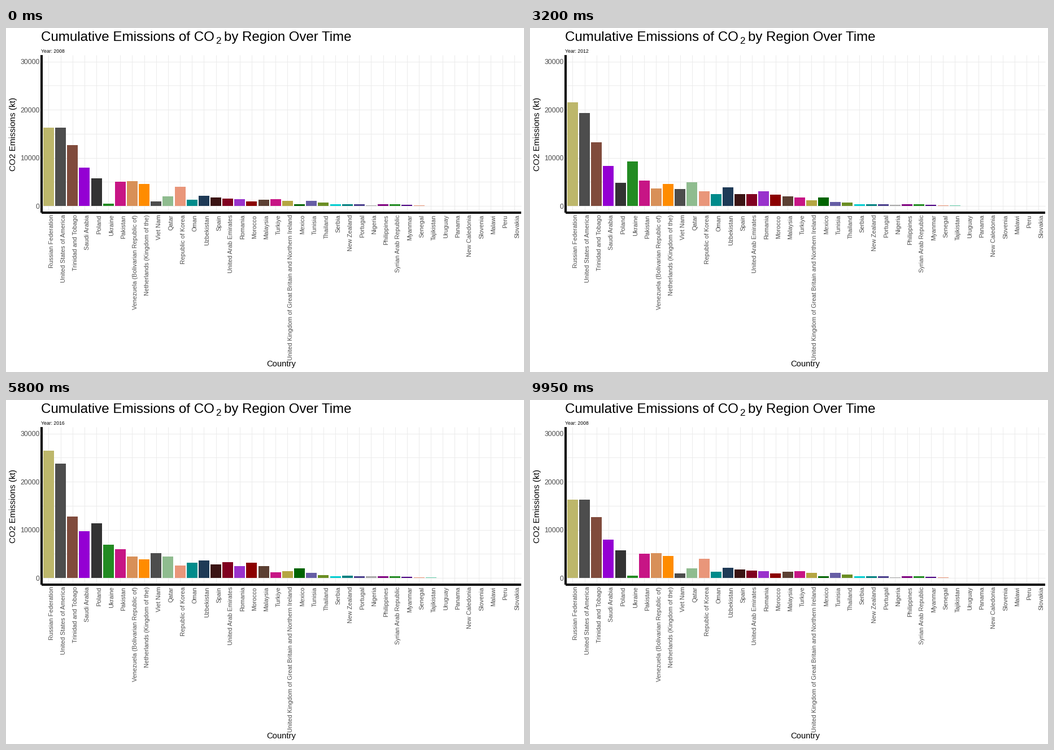
Recreate the animation shown at these times as a matplotlib script. Size 917 by 611 pixels, loop 10000 ms.

```python
import matplotlib.pyplot as plt
import numpy as np
from matplotlib.animation import FuncAnimation
from matplotlib.collections import LineCollection
from matplotlib.patches import Rectangle

W, H, DPI = 917, 611, 64
FRAMES, INTERVAL = 200, 50
FIRST_YEAR = 2008

# Panel geometry in pixels
LEFT, RIGHT, TOP, BOTTOM = 62.7, 912, 48, 327.7
FIRST_X, STEP_X, BAR_W = 75.4, 21.15, 19
ZERO_Y, PX_PER_KT = 316, 0.00855

# Country, bar colour, emissions in 100 kt spread over the years
COUNTRIES = [
    ("Russian Federation", "#bdb76b", 162, 211, 219, 264, 262, 296),
    ("United States of America", "#4d4d4d", 162, 169, 215.5, 237, 277, 282),
    ("Trinidad and Tobago", "#804b3c", 126, 141, 125, 128, 124, 168),
    ("Saudi Arabia", "#9400d3", 79, 83, 84, 97, 102, 115),
    ("Poland", "#333333", 57, 42, 53, 114, 110, 111),
    ("Ukraine", "#228b22", 5, 59, 123, 69, 44, 99),
    ("Pakistan", "#c71585", 50, 54, 51, 60, 56, 67),
    ("Venezuela (Bolivarian Republic of)", "#d89058", 52, 40, 33, 44, 46, 51),
    ("Netherlands (Kingdom of the)", "#ff8c00", 46, 47, 45, 39, 32, 37),
    ("Viet Nam", "#4d4d4d", 9, 11, 57, 52, 52, 55),
    ("Qatar", "#8fbc8f", 20, 23, 74, 45, 43, 41),
    ("Republic of Korea", "#e9967a", 39.5, 32, 30, 26, 27, 34),
    ("Oman", "#008b8b", 13, 14, 34, 32, 31, 34),
    ("Uzbekistan", "#1e3a56", 21, 22, 54, 36, 8.5, 18),
    ("Spain", "#3b1414", 18, 24, 26, 28, 29, 31),
    ("United Arab Emirates", "#800020", 15, 16, 32, 33, 30, 33),
    ("Romania", "#9932cc", 14, 13, 47, 25, 30, 28),
    ("Morocco", "#8b0000", 9, 25, 23, 31, 28, 31),
    ("Malaysia", "#5c4033", 13, 19, 21, 24, 27, 27),
    ("Turkiye", "#c71585", 14, 19, 16, 12, 15, 24),
    ("United Kingdom of Great Britain and Northern Ireland", "#b5a642", 10, 15.5),
    ("Mexico", "#006400", 4, 9, 25, 20, 8.5, 11),
    ("Tunisia", "#665ea5", 10, 6, 11, 11, 12, 13),
    ("Thailand", "#6b8e23", 7.5, 5),
    ("Serbia", "#00ced1", 4),
    ("New Zealand", "#008080", 3, 5),
    ("Portugal", "#483d8b", 4),
    ("Nigeria", "#a9a9a9", 1, 5),
    ("Philippines", "#800080", 3, 4.5),
    ("Syrian Arab Republic", "#228b22", 4, 3),
    ("Myanmar", "#4b0082", 2),
    ("Senegal", "#e9967a", 1),
    ("Tajikistan", "#66cdaa", 1),
]
EMPTY = ["Uruguay", "Panama", "New Caledonia", "Slovenia", "Malawi", "Peru", "Slovakia"]
KNOTS = (2008, 2011 + 1 / 9, 2013 + 2 / 3, 2016.375, 2018, 2020.5)

STARTS = [5 + 14 * k for k in range(7)] + [101 + 13 * k for k in range(8)]


def emissions(points, year):
    """Height in kt at a fractional year."""
    if len(points) == len(KNOTS):
        times = KNOTS
    else:
        times = np.linspace(KNOTS[0], KNOTS[-1], len(points))
    late_growth = 1 + 0.012 * np.clip(year - KNOTS[-1], 0, 0.5)
    return 100 * np.interp(year, times, points) * late_growth


def reported(name, year):
    if name == "Tajikistan":
        return year >= 2011
    return not (name == "Qatar" and year == 2018)


def timeline(frame):
    """Start year, end year and progress of the move between them."""
    k = sum(start <= frame for start in STARTS) - 1
    if k < 0:
        return FIRST_YEAR, FIRST_YEAR, 1
    steps = 9 if k < 6 else 8
    progress = min(1, (frame - STARTS[k] + 1) / steps)
    year = FIRST_YEAR + k
    following = FIRST_YEAR if k == len(STARTS) - 1 else year + 1
    return year, following, progress


def pt(px):
    return px * 72 / DPI


def column(i):
    return FIRST_X + i * STEP_X


def level(kt):
    return ZERO_Y - kt * PX_PER_KT


plt.rcParams["font.family"] = "Liberation Sans"
fig = plt.figure(figsize=(W / DPI, H / DPI), dpi=DPI, facecolor="white")
ax = fig.add_axes([0, 0, 1, 1])
ax.set_xlim(0, W)
ax.set_ylim(H, 0)
ax.axis("off")


def text(x, y, s, px, color="black", ha="left", va="baseline", rotation=0):
    return ax.text(x, y, s, fontsize=pt(px), color=color, ha=ha, va=va,
                   rotation=rotation, rotation_mode="anchor")


names = [row[0] for row in COUNTRIES] + EMPTY
grid = [[(column(i), TOP), (column(i), BOTTOM)] for i in range(len(names))]
grid += [[(LEFT, level(kt)), (RIGHT, level(kt))] for kt in range(0, 30001, 5000)]
ax.add_collection(LineCollection(grid, colors="#ebebeb", linewidths=pt(1), zorder=1))

bars = []
for i, (name, color, *points) in enumerate(COUNTRIES):
    bar = Rectangle((column(i) - BAR_W / 2, ZERO_Y), BAR_W, 0,
                    facecolor=color, linewidth=0, zorder=2)
    ax.add_patch(bar)
    bars.append((bar, name, points))

ax.plot([LEFT, LEFT], [TOP, BOTTOM], color="black", lw=pt(4),
        solid_capstyle="butt", zorder=3)
ax.plot([LEFT, RIGHT], [BOTTOM, BOTTOM], color="black", lw=pt(4),
        solid_capstyle="butt", zorder=3)

for i, name in enumerate(names):
    text(column(i) + 8.5, 331.5, name, 10.85, "#4d4d4d", ha="right", rotation=90)
for kt in range(0, 30001, 10000):
    text(59.5, level(kt) + 4.6, str(kt), 12.4, "#4d4d4d", ha="right")

text(62.3, 23, "Cumulative Emissions of CO", 24.1)
text(370.8, 28, "2", 17)
text(386, 23, "by Region Over Time", 24)
text(487.5, 601, "Country", 14.8, ha="center")
text(17.3, 188, "CO2 Emissions (kt)", 15.3, ha="center", rotation=90)
subtitle = text(62.5, 44, "", 8.6)


def update(frame):
    year, following, progress = timeline(frame)
    wraps = following < year
    subtitle.set_text(f"Year: {following if progress > 0.5 else year}")
    for bar, name, points in bars:
        if wraps:
            ends = emissions(points, year), emissions(points, following)
            kt = ends[0] + (ends[1] - ends[0]) * progress
        else:
            kt = emissions(points, year + (following - year) * progress)
        bar.set_y(level(kt))
        bar.set_height(kt * PX_PER_KT)
        bar.set_visible(reported(name, following)
                        and (progress == 1 or reported(name, year)))
    return [subtitle] + [bar for bar, _, _ in bars]


anim = FuncAnimation(fig, update, frames=FRAMES, interval=INTERVAL,
                     repeat=True, repeat_delay=0, blit=False)
plt.show()
```
